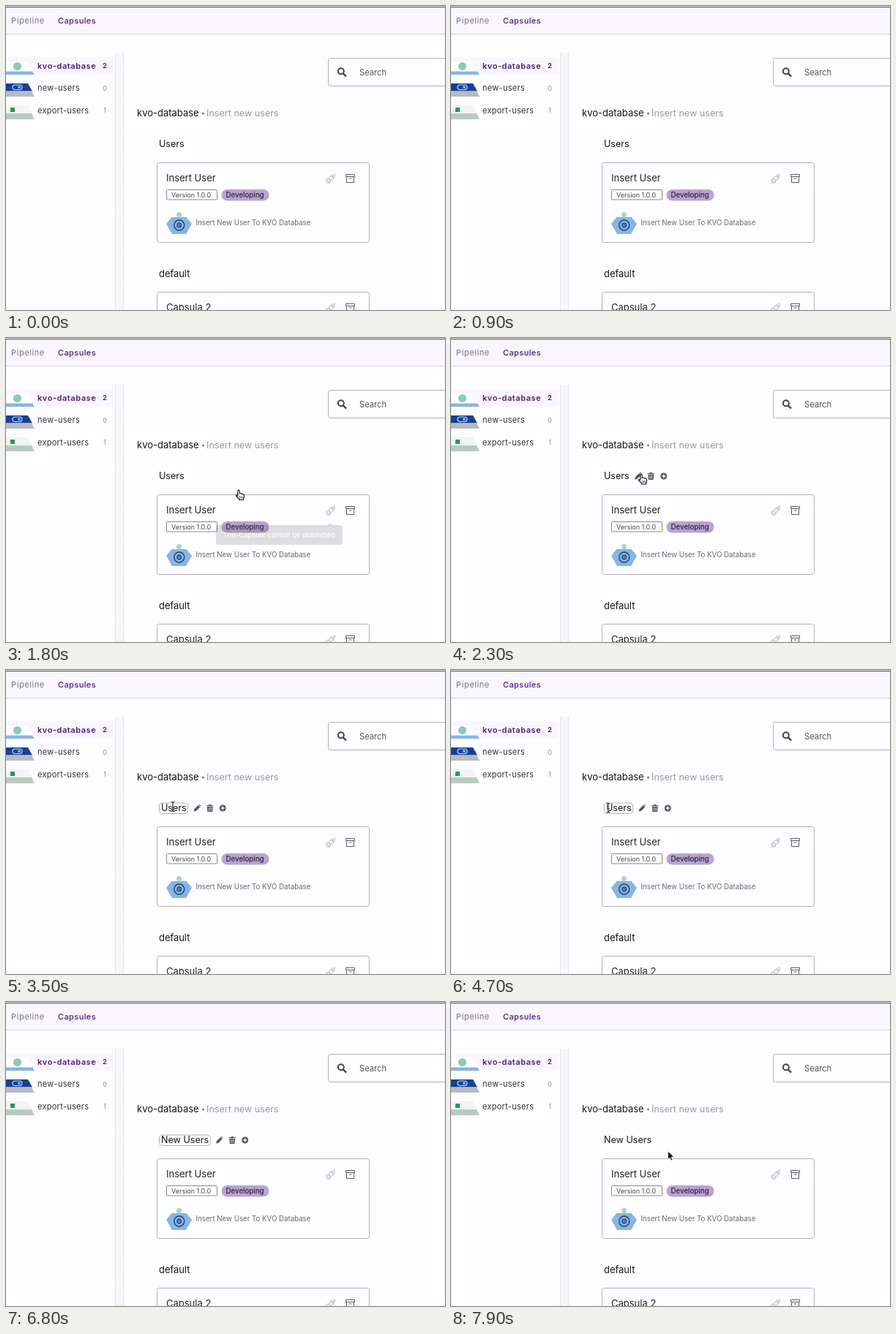
Recreate the animation shown at these times as an HTML page. Size 600x416 px, loop 8000 ms.

```html
<!DOCTYPE html>
<html lang="en">
<head>
<meta charset="utf-8">
<title>Capsules</title>
<style>
  html, body { margin: 0; width: 100%; height: 100%; overflow: hidden; background: #fefdff; }
  svg { display: block; width: 600px; height: 416px; font: 12.6px Inter, "Open Sans", sans-serif; }
  .side { font-size: 11px; letter-spacing: .28px; fill: #333; }
  .small { font-size: 9.7px; }
  .title { font-size: 13px; fill: #222; }
  .line { fill: none; stroke: #b2b0b5; }
</style>
</head>
<body>
<svg viewBox="0 0 600 416">
  <defs>
    <g id="rocket" fill="none" stroke="#bdbdc1" stroke-width="1.1" stroke-linejoin="round">
      <path d="M4 6.5C6 2.5 8.500 .5 12.500 .5C12.500 4.500 10.500 7 6.500 9ZM4 6.500H1.500L.5 9H3.500M6.500 9V11.500L4 12.500V9.500M3 10.500L1 12.500"/>
      <circle cx="9.300" cy="3.800" r="1"/>
    </g>
    <g id="archive" fill="none" stroke="#5c5b5f">
      <path d="M.5 .5H12.500V3.500H.5ZM1.500 3.500V11.500H11.500V3.500M4.700 6H8.300"/>
    </g>
    <pattern id="grain" width="4" height="4" patternUnits="userSpaceOnUse">
      <rect width="4" height="4" fill="#f9f8fa"/>
      <path d="M0 .5H2M2 2.500H4" stroke="#f1f0f3"/>
    </pattern>
  </defs>

  <rect width="600" height="416" fill="#fefdff"/>
  <rect y="1" width="600" height="37" fill="#f9f6fe"/>
  <rect y="1" width="600" height="1" fill="#4a484e"/>
  <path d="M0 38.500H600" stroke="#d9d6df"/>
  <g font-size="11">
    <text x="7" y="24" fill="#77757a" letter-spacing=".6">Pipeline</text>
    <text x="71" y="24" fill="#4a1a7c" font-weight="500" letter-spacing=".4">Capsules</text>
  </g>

  <rect x="149" y="64" width="12" height="352" fill="url(#grain)"/>
  <path d="M149.500 64V416M160.500 64V416" stroke="#e6e4e9"/>
  <rect y="70" width="147" height="24" fill="#f9f6fe"/>
  <path d="M0 76H29L36 90H0Z" fill="#fff"/>
  <path d="M0 89.500H36L39 94H0Z" fill="#86b5e4"/>
  <circle cx="15.500" cy="82.500" r="5.500" fill="#8acbbd"/>
  <path d="M0 106H30L36 116.500H0Z" fill="#173f93"/>
  <path d="M0 116.500H35L39 124H0Z" fill="#b7bbc1"/>
  <rect x="9" y="108" width="13" height="6.500" rx="3.200" fill="none" stroke="#c9e4ff" stroke-width="1.200"/>
  <circle cx="18" cy="111.200" r="2" fill="#65b5f4"/>
  <path d="M0 136H30L36 147H0Z" fill="#f3f4f4"/>
  <path d="M0 147H35L39 155H0Z" fill="#b9cbc0"/>
  <rect x="6" y="139" width="6" height="6" fill="#219b58"/>
  <g class="side">
    <text x="43" y="85.500" fill="#4a1a7c" font-weight="600" letter-spacing=".55" style="letter-spacing:.55px">kvo-database</text>
    <text x="43" y="116">new-users</text>
    <text x="43" y="146.500">export-users</text>
    <g font-size="9.500">
      <text x="132" y="85" fill="#4a1a7c" font-weight="600">2</text>
      <text x="132" y="115.500" fill="#929096">0</text>
      <text x="133" y="146" fill="#929096">1</text>
    </g>
  </g>

  <rect class="line" x="440.500" y="71.500" width="180" height="38" rx="3"/>
  <g fill="none" stroke="#444" stroke-width="2">
    <circle cx="457.800" cy="89.300" r="4"/>
    <path d="M460.800 92.300L465 96.500" stroke-width="2.400"/>
  </g>
  <text x="483" y="94.500" font-size="11.200" fill="#555">Search</text>

  <text x="179" y="151" font-size="13" fill="#161616">kvo-database</text>
  <circle cx="269.500" cy="147" r="1.500" fill="#777"/>
  <text x="274" y="151" fill="#98969b">Insert new users</text>

  <rect class="line" id="box" x="209.500" y="182" height="14.500" rx="4"/>
  <text id="label" y="193" fill="#161616" xml:space="preserve">Users</text>
  <g id="tools" fill="#57555a">
    <path d="M-4.500 4.500L-4 1.500L1.500 -4L4 -1.500L-1.500 4ZM2.200 -4.600L3 -5.200L5 -3.200L4.600 -2.300Z"/>
    <path d="M13 -4H15.500L16 -5H19L19.500 -4H22V-2.700H13ZM13.600 -2H21.400L20.900 5H14.100Z"/>
    <path d="M15.800 -.8V3.700M17.500 -.8V3.700M19.200 -.8V3.700" stroke="#e8e7ea" stroke-width=".7"/>
    <circle cx="35" r="4.500"/>
    <path d="M32.500 0H37.500M35 -2.500V2.500" stroke="#fff" stroke-width="1.400"/>
  </g>

  <rect class="line" x="206.500" y="214.500" width="290" height="109" rx="3"/>
  <circle id="halo" cx="470.500" cy="236.500" r="13.500" fill="#f5f3f7"/>
  <text class="title" x="219" y="240">Insert User</text>
  <use href="#rocket" x="437" y="230"/>
  <use href="#archive" x="464" y="230"/>
  <rect x="219.500" y="251.500" width="69" height="13.500" rx="1" fill="none" stroke="#8a888d"/>
  <text x="226" y="262" font-size="9" fill="#444">Version 1.0.0</text>
  <rect x="294.500" y="251" width="65" height="15.500" rx="7.750" fill="#b9a2d3"/>
  <text class="small" x="300.500" y="262" font-weight="500" fill="#2b2531">Developing</text>
  <path d="M219 298L226.500 289H246.500L254 298L246 312H227Z" fill="#86b5e6"/>
  <circle cx="236.500" cy="285.500" r="3.500" fill="#a9d6c6"/>
  <g fill="none" stroke="#1d3f70" stroke-width="1.400">
    <circle cx="236.700" cy="300" r="7"/>
    <circle cx="236.700" cy="300" r="2.700"/>
  </g>
  <circle cx="236.700" cy="300" r="1" fill="#1d3f70"/>
  <text class="small" x="259.500" y="300" fill="#69676c">Insert New User To KVO Database</text>

  <text x="209" y="371" font-size="12.900" fill="#161616">default</text>
  <rect class="line" x="206.500" y="391.500" width="290" height="109" rx="3"/>
  <text class="title" x="219" y="417">Capsula 2</text>
  <use href="#rocket" x="437" y="407"/>
  <use href="#archive" x="464" y="407"/>

  <g id="tip">
    <path d="M438.500 256.500L443 253L447.500 256.500Z" fill="#626164"/>
    <rect x="287" y="256" width="173" height="27" rx="3" fill="#626164"/>
    <text x="296" y="272.500" font-size="9.500" font-weight="500" fill="#fff">This Capsule cannot be published</text>
  </g>

  <g id="hand" stroke="#111" stroke-linejoin="round" stroke-linecap="round">
    <path d="M-1.200 8V1Q0 -.8 1.200 1V5Q2.700 4 3.500 5.300Q5 4.500 5.700 6Q7.500 5.500 7.500 7.500V10L6.500 12V13.500H.5V12.300L-3.600 8Q-3.400 6 -1.200 8Z" fill="#fff" stroke-width="1.100"/>
    <path d="M1.500 9V11.500M3.400 9V11.500M5.300 9V11.500" stroke-width=".7"/>
  </g>
  <g id="beam" fill="none">
    <path d="M-2.500 -6.500Q0 -6.500 0 -5V5Q0 6.500 -2.500 6.500M2.500 -6.500Q0 -6.500 0 -5M0 5Q0 6.500 2.500 6.500M-1.500 1.500H1.500" stroke="#fff" stroke-width="2.400"/>
    <path d="M-2.500 -6.500Q0 -6.500 0 -5V5Q0 6.500 -2.500 6.500M2.500 -6.500Q0 -6.500 0 -5M0 5Q0 6.500 2.500 6.500M-1.500 1.500H1.500" stroke="#111" stroke-width="1.100"/>
  </g>
  <path id="arrow" d="M0 0V11.500L2.700 9L4.500 13L6.500 12.200L4.700 8.200H8.300Z" fill="#111" stroke="#fff" stroke-width=".8"/>
</svg>
<script>
  const LOOP = 8000, STEP = 100;
  const $ = id => document.getElementById(id);
  const [box, label, tools, halo, tip] = ["box", "label", "tools", "halo", "tip"].map($);
  const cursors = { hand: $("hand"), beam: $("beam"), arrow: $("arrow") };

  // Pointer path: time, x, y
  const path = [
    [1500, 553, 260], [1600, 414, 234], [1700, 358, 220], [1800, 318, 208],
    [1900, 290, 198], [2100, 266, 189], [2300, 260, 186.5], [2700, 260, 186],
    [3000, 252, 186], [3500, 228, 187], [3600, 226, 187], [4200, 215, 188.5],
    [7300, 215, 188.5], [7600, 262, 196], [7900, 296.5, 204]
  ];
  const typed = [[5200, "N"], [5600, "Ne"], [5800, "New"], [6300, "New "]];

  const show = (el, on) => el.setAttribute("visibility", on ? "visible" : "hidden");
  const within = (t, a, b) => t >= a && t < b;
  const move = (el, x, y) => el.setAttribute("transform", `translate(${x} ${y})`);

  function pointAt(t) {
    const i = path.findIndex(p => p[0] > t);
    if (i < 0) return path[path.length - 1].slice(1);
    if (i === 0) return path[0].slice(1);
    const [a, b] = [path[i - 1], path[i]];
    const k = (t - a[0]) / (b[0] - a[0]);
    return [1, 2].map(n => a[n] + (b[n] - a[n]) * k);
  }

  function cursorAt(t) {
    if (within(t, 1500, 3100)) return "hand";
    if (within(t, 3100, 5200) || within(t, 7400, 7600)) return "beam";
    return t >= 7600 ? "arrow" : "";
  }

  function draw(t) {
    const editing = within(t, 2700, 7600);
    const prefix = typed.reduce((s, [at, text]) => t >= at ? text : s, "");
    label.textContent = prefix + "Users";
    label.setAttribute("x", editing ? 212 : 209);
    const width = label.getComputedTextLength();

    show(box, editing);
    box.setAttribute("width", width + 4.5);
    show(tools, within(t, 2000, 7800));
    move(tools, editing ? width + 226.5 : width + 221, 189);

    show(halo, within(t, 1500, 1700));
    show(tip, within(t, 1600, 1900));
    tip.setAttribute("opacity", t < 1700 ? 1 : t < 1800 ? .65 : .2);

    const kind = cursorAt(t), [x, y] = pointAt(t);
    for (const name in cursors) {
      show(cursors[name], name === kind);
      move(cursors[name], x, y);
    }
  }

  const start = performance.now();
  function tick(now) {
    const t = Math.max(0, now - start) % LOOP;
    draw(Math.floor(t / STEP) * STEP);
    requestAnimationFrame(tick);
  }
  draw(0);
  requestAnimationFrame(tick);
</script>
</body>
</html>
```
